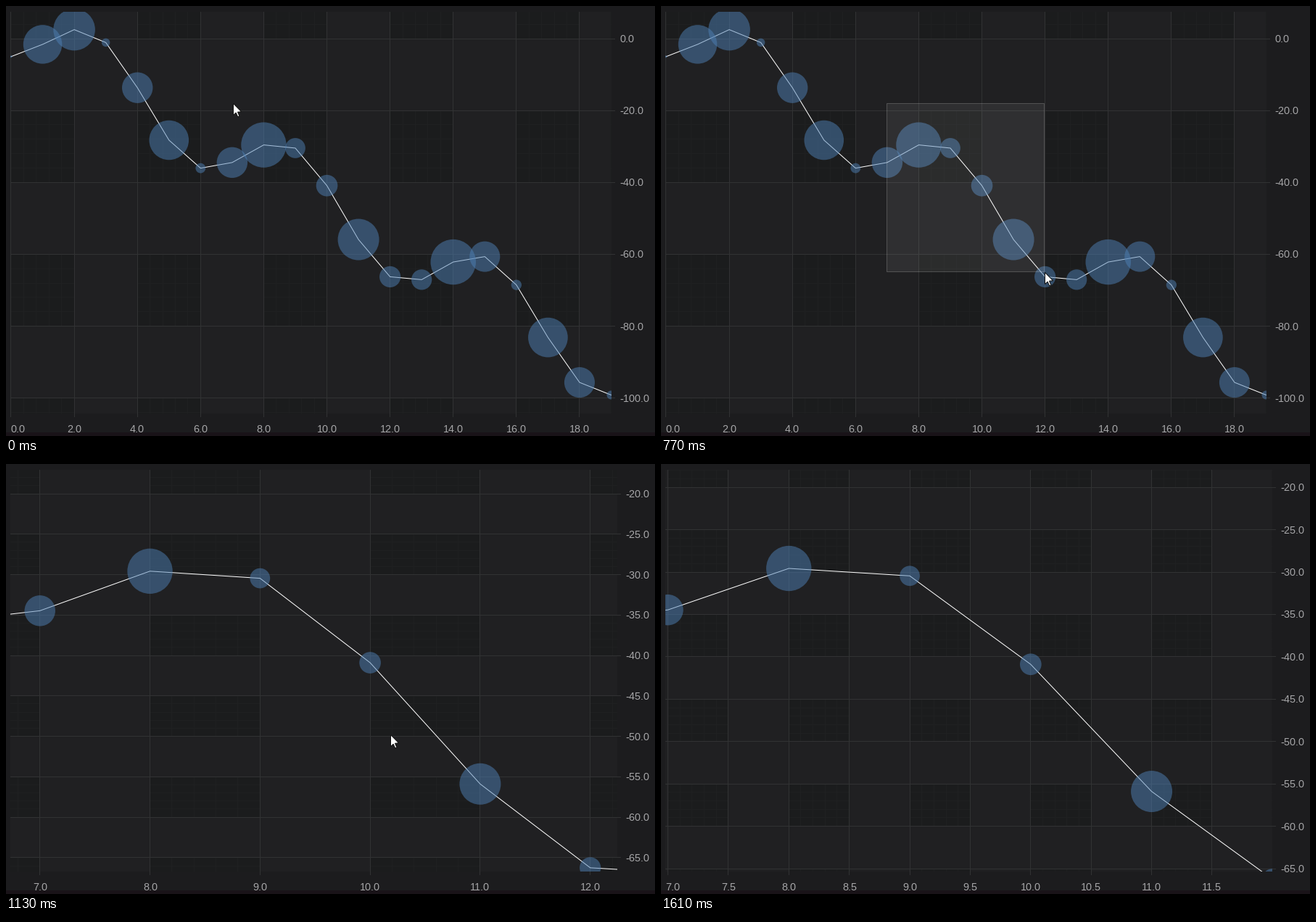
Recreate the animation shown at these times as a matplotlib script. Size 895 by 593 pixels, loop 1860 ms.

```python
import math

import numpy as np
import matplotlib.pyplot as plt
from matplotlib.animation import FuncAnimation
from matplotlib.collections import LineCollection, PolyCollection
from matplotlib.patches import Polygon, Rectangle

W, H, DPI = 895, 593, 64
PX = 72 / DPI                      # points per pixel
LOOP, TICK = 1860, 10
LEFT, TOP, BOTTOM = 7, 8, 562
FONT = 14

BACK, PLOT, BAND = "#1c1c1e", "#1b1c1d", "#202022"
MAJOR, MINOR, LABEL = "#313233", "#1f2021", "#a8a8aa"

# Axis ranges before and after the zoom: xmin, xmax, ymin, ymax
START = np.array([0, 19, -104.3, 7.47])
END = np.array([6.985, 11.995, -65.34, -17.93])

XS = np.arange(20)
YS = np.cumsum(10 * np.sin(XS) - 5)
RADII = np.abs(30 * np.sin(XS) + 1.5)

# Pointer stops: time, x, y
STOPS = [(60, 313, 134), (577, 521, 362), (770, 529, 367), (1010, 529, 367),
         (1130, 530, 373), (1250, 752, 549), (1430, 858, 586),
         (1550, 862, 588)]
ARROW = np.array([(0.5, 0.5), (0.5, 16.7), (4.1, 13.2), (6.7, 18.8),
                  (8.9, 17.9), (6.5, 12.2), (11.6, 11.8)])


def held(t):
    """Start time of the picture shown at time t."""
    if t < 120:
        return 0
    start = 530 if t >= 530 else 120
    return start + 60 * ((t - start) // 60)


def zoom(t):
    """Exponential ease-out."""
    if t < 950:
        return 0
    s = min(1, 0.003 + 0.157 * (t - 950) / 60)
    return 1 - math.expm1(7 * (1 - s)) / math.expm1(7)


def pointer(t):
    for (t0, *a), (t1, *b) in zip(STOPS, STOPS[1:]):
        if t < t1:
            break
    s = min(1, max(0, (t - t0) / (t1 - t0)))
    s = s * s * (3 - 2 * s)
    return [round(p + (q - p) * s) for p, q in zip(a, b)]


def nice_step(span):
    raw = span / 10.2
    base = 10 ** math.floor(math.log10(raw))
    return next(m * base for m in (1, 2, 5, 10) if m * base >= raw)


def ticks(lo, hi, step):
    return np.arange(math.ceil(lo / step - 1e-9),
                     math.floor(hi / step + 1e-9) + 1) * step


def light_bands(lo, hi, step):
    for k in range(math.floor(lo / step), math.ceil(hi / step)):
        if k % 2:
            yield max(lo, k * step), min(hi, (k + 1) * step)


def crisp(v):
    """Centre of the pixel that a thin line at v falls on."""
    return math.ceil(v) - 0.5


def box(x0, y0, x1, y1):
    return [(x0, y0), (x1, y0), (x1, y1), (x0, y1)]


plt.rcParams.update({"text.hinting": "native", "text.hinting_factor": 1})
fig = plt.figure(figsize=(W / DPI, H / DPI), dpi=DPI, facecolor=BACK)
ax = fig.add_axes([0, 0, 1, 1])
ax.axis("off")

ax.add_patch(Rectangle((0, 588), W, 5, color="#191318", lw=0, zorder=0))
area = ax.add_patch(Rectangle((6, TOP), 829, BOTTOM - TOP, fc=PLOT, lw=0,
                              zorder=1))


def line_set(color, z):
    lines = LineCollection([], colors=color, linewidths=PX, snap=False,
                           capstyle="butt", zorder=z)
    return ax.add_collection(lines, autolim=False)


minor = line_set(MINOR, 2)
bands = ax.add_collection(PolyCollection([], facecolors=BAND, linewidths=0,
                                         snap=False, zorder=3),
                          autolim=False)
major = line_set(MAJOR, 4)
curve, = ax.plot([], [], color="white", lw=PX, zorder=5, snap=False)
bubbles = ax.scatter(XS, YS, s=(2 * RADII * PX) ** 2, c="#4e81b6", alpha=0.5,
                     linewidths=0, zorder=6, snap=False)
select = ax.add_patch(Rectangle((311.5, 134.5), 0, 0, fc=(1, 1, 1, 0.07),
                                ec=(1, 1, 1, 0.2), lw=PX, snap=False,
                                zorder=7))
arrow = ax.add_patch(Polygon(ARROW, fc="white", ec="#111111", lw=PX,
                             joinstyle="miter", snap=False, zorder=9))
labels = [ax.text(0, 0, "", va="baseline", color=LABEL,
                  family="Liberation Sans", fontsize=FONT * PX, zorder=8)
          for _ in range(26)]
ax.set_xlim(0, W)
ax.set_ylim(H, 0)


def draw_chart(x0, x1, y0, y1):
    right = 835 if y0 < -100 else 843

    def px(v):
        return LEFT + (v - x0) / (x1 - x0) * (right - 0.5 - LEFT)

    def py(v):
        return TOP + (y1 - v) / (y1 - y0) * (BOTTOM - TOP)

    def grid(dx, dy, tail):
        cols = [crisp(px(v)) for v in ticks(x0, x1, dx)]
        rows = [crisp(py(v)) for v in ticks(y0, y1, dy)]
        return ([[(x, TOP), (x, BOTTOM + tail)] for x in cols]
                + [[(6, y), (right + tail, y)] for y in rows])

    dx, dy = nice_step(x1 - x0), nice_step(y1 - y0)
    area.set_width(right - 6)
    minor.set_segments(grid(dx / 5, dy / 5, 0))
    major.set_segments(grid(dx, dy, 5))
    bands.set_verts(
        [box(crisp(px(a)), TOP, crisp(px(b)), BOTTOM)
         for a, b in light_bands(x0, x1, dx)]
        + [box(6, crisp(py(b)), right, crisp(py(a)))
           for a, b in light_bands(y0, y1, dy)])

    points = np.column_stack([px(XS), py(YS)])
    curve.set_data(points.T)
    bubbles.set_offsets(points)
    for part in (curve, bubbles):
        part.set_clip_path(area)

    names = []
    for v in ticks(x0, x1, dx):
        text = f"{v:.1f}"
        width = 8 * len(text) - 4
        x = min(max(px(v) - width / 2, 6), 842 - width)
        names.append((round(x), 588, text))
    for v in ticks(y0, y1, dy):
        names.append((right + 11, round(max(py(v), 15) + 5), f"{v + 0.0:.1f}"))
    for i, label in enumerate(labels):
        label.set_visible(i < len(names))
        if i < len(names):
            x, y, text = names[i]
            label.set_position((x, y))
            label.set_text(text)


def update(i):
    t = held(i * TICK)
    draw_chart(*(START + (END - START) * zoom(t)))
    x, y = pointer(t)
    arrow.set_xy(ARROW + (x, y))
    arrow.set_visible(t < 1610)
    select.set_visible(120 <= t < 950)
    select.set_width(x - 0.5 - 311.5)
    select.set_height(y - 0.5 - 134.5)
    return []


anim = FuncAnimation(fig, update, frames=LOOP // TICK, interval=TICK,
                     repeat=True, repeat_delay=0, blit=False)
plt.show()
```
